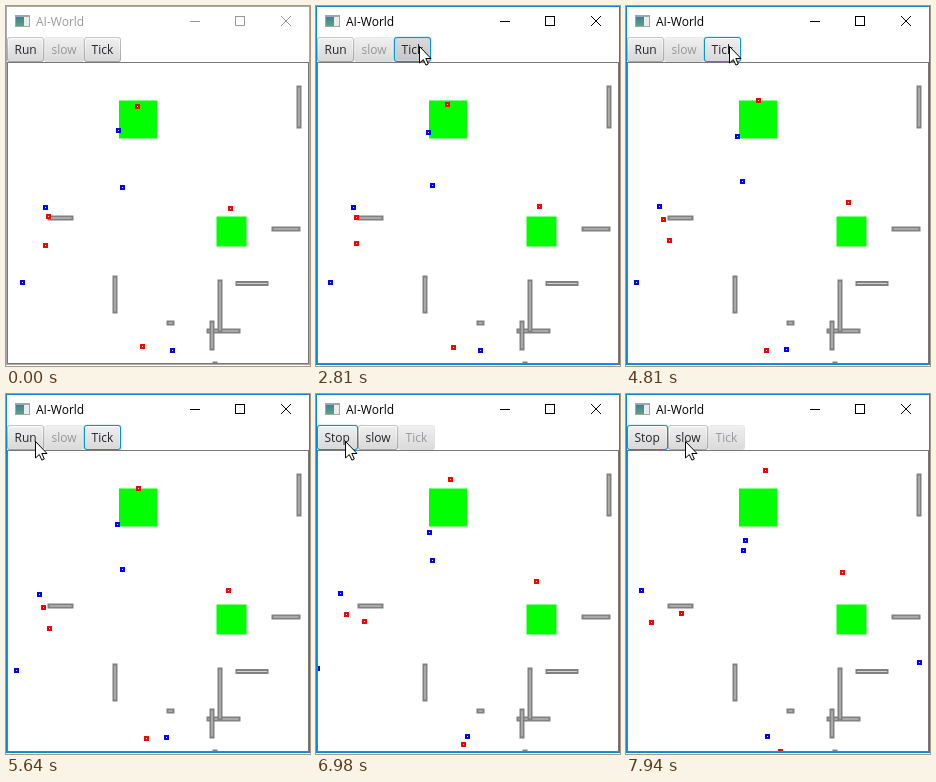
Recreate the animation shown at these times as an HTML page with a canvas. Size 304x360 px, loop 8000 ms.

```html
<!DOCTYPE html>
<html lang="en">
<head>
<meta charset="utf-8">
<title>AI-World</title>
<style>
html, body { margin: 0; width: 304px; height: 360px; overflow: hidden; background: #fff; }
canvas { display: block; }
</style>
</head>
<body>
<canvas id="stage" width="304" height="360"></canvas>
<script>
const ctx = document.getElementById('stage').getContext('2d');
const LOOP = 8000, ACTIVATE = 1130, RUN = 6020;
const RED = '#f00', BLUE = '#00f', FOCUS = '#0396d3';

// Walls are 5 px thick: x, y, length
const flatWalls = [[41, 209, 26], [265, 220, 29], [229, 274.5, 33], [200, 322, 34], [160, 314, 8], [206, 355, 5]];
const tallWalls = [[290, 79, 43], [106, 269, 38], [211, 273, 53], [203, 314, 30]];
// x, y, side
const food = [[112.5, 94, 38], [210, 210, 30]];

// Agents walk one pixel per tick: x, y, heading and turn per tick in degrees
const agent = (color, x, y, heading, turn) => ({ color, x, y, heading, turn });
const agents = [
  agent(RED, 131.5, 100.2, -84, 0.95),
  agent(BLUE, 112.5, 124.2, 107, -2.8),
  agent(BLUE, 116.2, 181, -91, 0.28),
  agent(BLUE, 39.6, 201.2, 179.5, 0.93),
  agent(RED, 42, 210.4, 149, -1.42),
  agent(RED, 39.2, 239, -50, 0),
  agent(RED, 224.4, 202, -104, -0.4),
  agent(BLUE, 16.3, 276.4, 170.5, 2.25),
  agent(RED, 136.3, 340.3, 47, -0.4),
  agent(BLUE, 166.2, 344.7, 196, -0.85)
];

// Release times of the Tick button; the clicks come a little faster each time
const clicks = [ACTIVATE + 220];
for (let k = 0; k < 5; k++) clicks.push(2350 + 690 * k - 25 * k * (k - 1));
const HOLD = 230;

const clamp = v => Math.max(0, Math.min(1, v));

function ticksAt(t) {
  const run = Math.max(0, Math.floor((t - RUN - 40) / 98));
  return clicks.filter(c => t >= c).length + run;
}

function agentAt({ x, y, heading, turn }, ticks) {
  for (let i = 0; i < ticks; i++) {
    const angle = (heading + turn * (i + 0.5)) * Math.PI / 180;
    x += Math.cos(angle);
    y += Math.sin(angle);
  }
  return [x < 1.2 ? x + 300 : x, y];
}

// Eased pointer progress, sampled every 73 ms
function glide(t, from, to) {
  const p = clamp((Math.floor((t - from) / 73) + 1) * 73 / (to - from + 73));
  return p * p * (3 - 2 * p);
}

function cursorAt(t) {
  if (t < 760) return null;
  const enter = glide(t, 760, 900), press = t >= ACTIVATE ? 1 : 0;
  const toRun = glide(t, 5200, 5640), toSlow = glide(t, 7340, 7940);
  return [
    Math.round(129 - 24 * enter - 2 * press - 74 * toRun + 30 * toSlow),
    Math.round(7 + 29 * enter + 4 * press + 7 * toRun)
  ];
}

function rect(x, y, w, h, color) {
  ctx.fillStyle = color;
  ctx.fillRect(x, y, w, h);
}

function frame(x, y, w, h, color) {
  ctx.strokeStyle = color;
  ctx.lineWidth = 1;
  ctx.strokeRect(x + 0.5, y + 0.5, w - 1, h - 1);
}

function box(x, y, w, h, edge, fill) {
  rect(x + 1, y + 1, w - 2, h - 2, fill);
  ctx.strokeStyle = edge;
  ctx.lineWidth = 2;
  ctx.strokeRect(x + 1, y + 1, w - 2, h - 2);
}

function label(s, x, y, color) {
  ctx.font = '12px "Open Sans", "Noto Sans", sans-serif';
  ctx.fillStyle = color;
  ctx.fillText(s, x, y);
}

function rounded(x, y, w, h, r, fill) {
  ctx.beginPath();
  ctx.roundRect(x, y, w, h, r);
  ctx.fillStyle = fill;
  ctx.fill();
}

function shade(y0, y1, top, bottom) {
  const g = ctx.createLinearGradient(0, y0, 0, y1);
  g.addColorStop(0, top);
  g.addColorStop(1, bottom);
  return g;
}

function button(s, x, w, { off, focus, down }) {
  const grad = (a, b) => shade(32, 55, a, b);
  ctx.globalAlpha = off ? 0.4 : 1;
  if (focus) rounded(x - 1, 30, w + 2, 27, 4, FOCUS + '22');
  rounded(x, 31, w, 25, 3, focus ? FOCUS : grad('#c4c4c4', '#a5a5a5'));
  rounded(x + 1, 32, w - 2, 23, 2, down ? '#d5d5d5' : grad('#fdfdfd', '#dcdcdc'));
  rounded(x + 2, 33, w - 4, 21, 1.5, down ? grad('#d9d9d9', '#c6c6c6') : grad('#efefef', '#d8d8d8'));
  label(s, x + 7.5, 48, '#24242c');
  ctx.globalAlpha = 1;
}

function titleBar(ink) {
  rect(9, 9, 15, 12, '#a3a6a9');
  rect(10, 11, 13, 9, '#e9eeec');
  rect(10, 11, 8, 9, shade(11, 20, '#3f7f9c', '#5aa57c'));
  label('AI-World', 30, 20, ink);
  rect(184, 15, 10, 1, ink);
  frame(229, 10, 10, 10, ink);
  ctx.beginPath();
  ctx.moveTo(275, 10); ctx.lineTo(285, 20);
  ctx.moveTo(285, 10); ctx.lineTo(275, 20);
  ctx.stroke();
}

function toolbar(t) {
  const armed = t >= RUN, running = t >= RUN + 70;
  const w = running ? 41 : 37;
  button(running ? 'Stop' : 'Run', 1, w, { focus: armed, down: armed && !running });
  button('slow', w + 1, 40, { off: !running });
  button('Tick', w + 41, 37, {
    off: running,
    focus: t >= ACTIVATE && !armed,
    down: clicks.some(c => t >= c - HOLD && t < c)
  });
}

function world(ticks) {
  const wall = (x, y, w, h) => box(x + 0.5, y + 0.5, w, h, '#808080', '#d3d3d3');
  ctx.save();
  ctx.beginPath();
  ctx.rect(1, 56, 302, 302);
  ctx.clip();
  food.forEach(([x, y, side]) => rect(x + 0.5, y + 0.5, side, side, '#0f0'));
  flatWalls.forEach(([x, y, len]) => wall(x, y, len, 5));
  tallWalls.forEach(([x, y, len]) => wall(x, y, 5, len));
  for (const a of agents) {
    const [x, y] = agentAt(a, ticks).map(Math.floor);
    box(x - 2, y - 2, 5, 5, a.color, '#ddd');
  }
  ctx.restore();
  frame(1, 56, 302, 302, '#777');
}

function cursor(x, y) {
  const outline = [[0, 0], [0, 16.5], [3.8, 13], [6.4, 18.6], [8.8, 17.5], [6.3, 12], [11.5, 12]];
  ctx.beginPath();
  outline.forEach(([dx, dy]) => ctx.lineTo(x + 0.5 + dx, y + 0.5 + dy));
  ctx.closePath();
  ctx.fillStyle = '#fff';
  ctx.fill();
  ctx.strokeStyle = '#000';
  ctx.stroke();
}

function draw(t) {
  const active = t >= ACTIVATE;
  rect(0, 0, 304, 360, '#fff');
  titleBar(active ? '#000' : '#999');
  toolbar(t);
  world(ticksAt(t));
  frame(0, 0, 304, 359, active ? '#0f86d8' : '#aaa');
  const tip = cursorAt(t);
  if (tip) cursor(...tip);
}

const start = performance.now();
function loop() {
  draw((performance.now() - start) % LOOP);
  requestAnimationFrame(loop);
}
loop();
</script>
</body>
</html>
```
